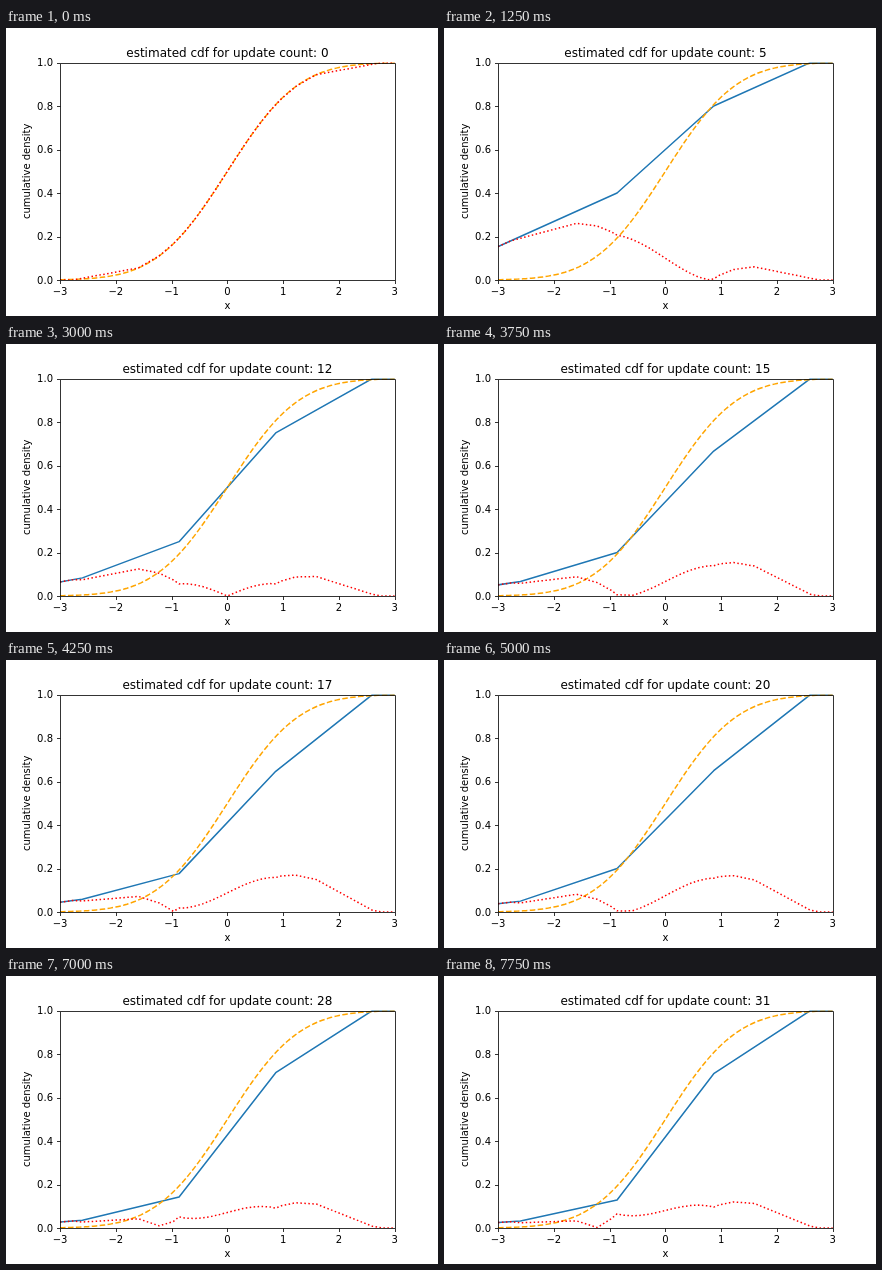
Write an HTML page with a canvas that moves like this. It is 432 by 288 pixels and loops after 8000 ms.

```html
<!DOCTYPE html>
<html lang="en">
<head>
<meta charset="utf-8">
<title>Estimated cdf</title>
<style>
html, body { margin: 0; width: 100%; height: 100%; overflow: hidden; background: #fff; }
canvas { display: block; }
</style>
</head>
<body>
<canvas id="stage" width="432" height="288"></canvas>
<script>
const ctx = document.getElementById('stage').getContext('2d');
const STEP_MS = 250;
const LEFT = 54, RIGHT = 388.8, TOP = 34.56, BOTTOM = 252;
const MID_X = (LEFT + RIGHT) / 2, MID_Y = (TOP + BOTTOM) / 2;

// Histogram bin hit by each successive update.
const DRAWS = '2130222123233233212322222322232';
const EDGES = [-2.5, -1.5, -0.5, 0.5, 1.5].map(k => k * Math.sqrt(3));

const toX = x => LEFT + (x + 3) / 6 * (RIGHT - LEFT);
const toY = y => BOTTOM - y * (BOTTOM - TOP);
const snap = v => Math.floor(v + 0.5) + 0.5;

function normalCdf(x) {
  const z = Math.abs(x), t = 1 / (1 + 0.2316419 * z);
  const poly = t * (0.31938153 + t * (-0.356563782 + t * (1.781477937 + t * (-1.821255978 + t * 1.330274429))));
  const tail = Math.exp(-z * z / 2) / Math.sqrt(2 * Math.PI) * poly;
  return x < 0 ? tail : 1 - tail;
}

function normalQuantile(p) {
  let lo = -2.77, hi = 2.77;
  for (let i = 0; i < 40; i++) {
    const mid = (lo + hi) / 2;
    if (normalCdf(mid) < p) lo = mid; else hi = mid;
  }
  return lo;
}

function interpolate(x, xs, ys) {
  const i = xs.findIndex(v => v >= x);
  if (i < 0) return ys[ys.length - 1];
  if (i === 0) return ys[0];
  return ys[i - 1] + (ys[i] - ys[i - 1]) * (x - xs[i - 1]) / (xs[i] - xs[i - 1]);
}

const levels = Array.from({ length: 19 }, (_, i) => i / 18);
const quantiles = levels.map(normalQuantile);
const knots = [-3, 3, ...EDGES, ...quantiles].filter(x => Math.abs(x) <= 3).sort((a, b) => a - b);
const smooth = Array.from({ length: 121 }, (_, i) => -3 + i / 20);

function estimate(count) {
  const sums = EDGES.map((_, i) => [...DRAWS.slice(0, count)].filter(bin => bin < i).length);
  return sums.map(s => s / Math.max(count, 1));
}

function plot(xs, f, color, dash) {
  ctx.beginPath();
  xs.forEach(x => ctx.lineTo(toX(x), toY(f(x))));
  ctx.strokeStyle = color;
  ctx.lineWidth = 1.5;
  ctx.lineJoin = 'round';
  ctx.setLineDash(dash);
  ctx.stroke();
}

function label(text, x, y, size = 10, align = 'center') {
  ctx.font = size + 'px "DejaVu Sans", sans-serif';
  ctx.textAlign = align;
  ctx.fillText(text, x, y);
}

function drawAxes(count) {
  ctx.setLineDash([]);
  ctx.strokeStyle = ctx.fillStyle = '#000';
  ctx.lineWidth = 0.8;
  ctx.beginPath();
  ctx.rect(snap(LEFT), snap(TOP), snap(RIGHT) - snap(LEFT), snap(BOTTOM) - snap(TOP));
  for (let v = -3; v <= 3; v++) {
    const x = snap(toX(v));
    ctx.moveTo(x, 252.5);
    ctx.lineTo(x, 256);
    label(String(v).replace('-', '\u2212'), toX(v), 267);
  }
  for (let i = 0; i <= 5; i++) {
    const y = snap(toY(i / 5));
    ctx.moveTo(54.5, y);
    ctx.lineTo(51, y);
    label((i / 5).toFixed(1), 47, Math.round(toY(i / 5) + 3.8), 10, 'right');
  }
  ctx.stroke();
  label('x', MID_X, 281);
  label('estimated cdf for update count: ' + count, MID_X, 29, 12);
  ctx.save();
  ctx.translate(24, MID_Y);
  ctx.rotate(-Math.PI / 2);
  label('cumulative density', 0, 0);
  ctx.restore();
}

function draw(count) {
  const heights = estimate(count);
  const estimated = x => interpolate(x, EDGES, heights);
  const error = x => Math.abs(estimated(x) - interpolate(x, quantiles, levels));

  ctx.fillStyle = '#fff';
  ctx.fillRect(0, 0, 432, 288);
  ctx.save();
  ctx.beginPath();
  ctx.rect(LEFT, TOP, RIGHT - LEFT, BOTTOM - TOP);
  ctx.clip();
  if (count) plot([...EDGES, 3], estimated, '#1f77b4', []);
  plot(smooth, normalCdf, '#ffa500', [5.55, 2.4]);
  plot(knots, error, '#ff0000', [1.5, 2.475]);
  ctx.restore();
  drawAxes(count);
}

function tick() {
  draw(Math.floor(performance.now() / STEP_MS) % (DRAWS.length + 1));
  requestAnimationFrame(tick);
}
tick();
</script>
</body>
</html>
```
